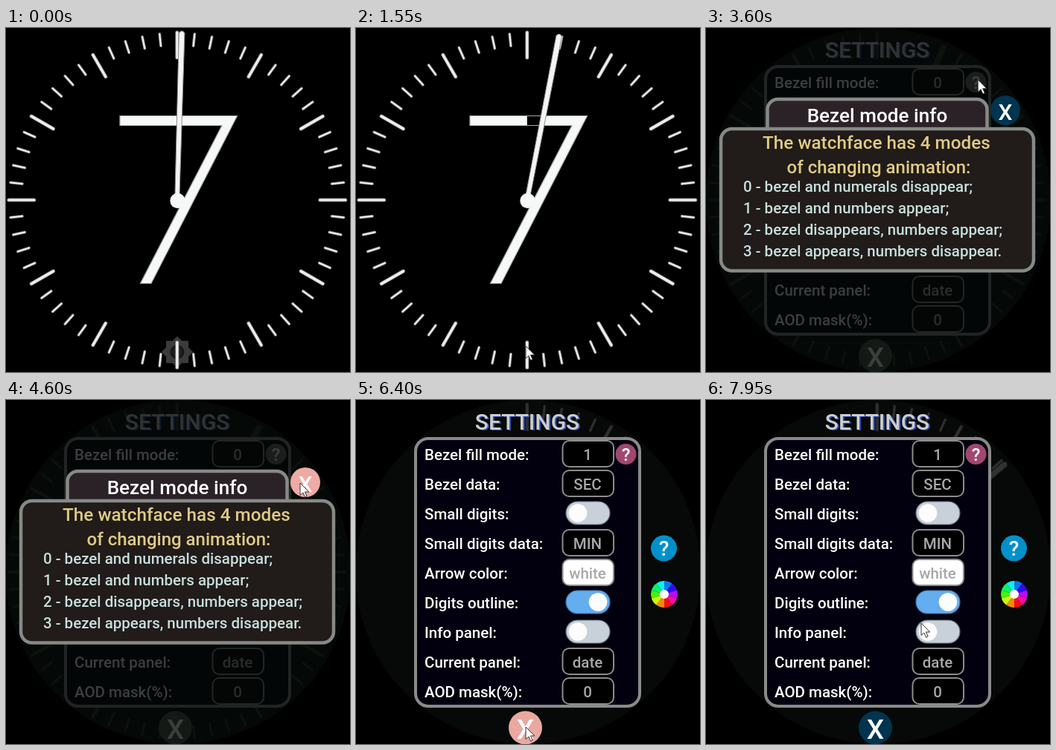
An HTML page that plays this animation: 462 by 464 pixels, repeating every 8000 ms.

```html
<!DOCTYPE html>
<html lang="en">
<head>
<meta charset="utf-8">
<title>Watch face settings</title>
<style>
  html, body { margin: 0; width: 100%; height: 100%; overflow: hidden; background: #000; }
  svg { display: block; width: 100vw; height: 100vh; }
  text { font-family: Roboto, sans-serif; font-weight: 500; }
</style>
</head>
<body>
<svg id="stage" viewBox="0 0 462 464"></svg>
<script>
const LOOP = 8000, CX = 229.8, CY = 232;
const stage = document.getElementById('stage');

function add(parent, tag, attrs = {}, text) {
  const el = document.createElementNS('http://www.w3.org/2000/svg', tag);
  for (const k in attrs) el.setAttribute(k, attrs[k]);
  if (text !== undefined) el.textContent = text;
  parent.appendChild(el);
  return el;
}
const group = parent => add(parent, 'g');
const circle = (parent, cx, cy, r, fill, opacity = 1) =>
  add(parent, 'circle', { cx, cy, r, fill, 'fill-opacity': opacity });
const box = (parent, x, y, width, height, rx, fill, stroke, sw) =>
  add(parent, 'rect', { x, y, width, height, rx, fill, stroke, 'stroke-width': sw });
const label = (parent, x, y, str, fill = '#fff', size = 20.5, anchor = 'start') =>
  add(parent, 'text', { x, y, fill, 'font-size': size, 'text-anchor': anchor }, str);
const show = (el, on) => el.setAttribute('visibility', on ? 'visible' : 'hidden');

function polar(deg, r) {
  const a = deg * Math.PI / 180;
  return [CX + r * Math.sin(a), CY - r * Math.cos(a)];
}
function sector(from, to) {
  const [x0, y0] = polar(from, 400), [x1, y1] = polar(to, 400);
  return `M${CX} ${CY}L${x0} ${y0}A400 400 0 ${to - from > 180 ? 1 : 0} 1 ${x1} ${y1}Z`;
}

// Clock
const clock = group(stage);
const gear = group(clock);
for (const turn of [0, 45])
  add(gear, 'rect', { x: 215, y: 422, width: 30, height: 30, fill: '#3c3c3c', transform: `rotate(${turn} 230 437)` });
add(gear, 'circle', { cx: 230, cy: 437, r: 8, fill: '#222', stroke: '#191919', 'stroke-width': 3 });

const ticks = Array.from({ length: 60 }, (_, i) => {
  const major = i % 5 === 0;
  const [x1, y1] = polar(i * 6, major ? 192 : 209);
  const [x2, y2] = polar(i * 6, major ? 226 : 225);
  const g = group(clock);
  const w = major ? 5 : 3.8;
  add(g, 'line', { x1, y1, x2, y2, stroke: '#888', 'stroke-width': w, 'stroke-linecap': 'round' });
  add(g, 'line', { x1, y1, x2, y2, stroke: '#efefef', 'stroke-width': w - 1.8, 'stroke-linecap': 'round' });
  return g;
});

const seven = 'M153 118.5H310.5L195 344.5H180.5L290 131.5H153Z';
const clip = add(add(add(stage, 'defs'), 'clipPath', { id: 'sweep' }), 'path');
add(clock, 'path', { d: seven, fill: '#f6f8f8', 'clip-path': 'url(#sweep)' });
add(clock, 'path', { d: seven, fill: 'none', stroke: '#a8a8a8', 'stroke-width': 1.2 });

const hand = group(clock);
add(hand, 'path', {
  d: `M${CX - 3} ${CY}L${CX - 3.8} 7Q${CX} 1 ${CX + 3.8} 7L${CX + 3} ${CY}Z`,
  fill: '#f4f4f4', stroke: '#909090', 'stroke-width': 1
});
circle(clock, 230.5, 233, 10.2, '#f6f8f8');

// Settings screen
const settings = group(stage);
circle(settings, 231, 232, 232, '#080c09', .83);
label(settings, 232, 41, 'SETTINGS', '#2c4cb4', 30, 'middle');
label(settings, 230, 40, 'SETTINGS', '#cdcdcd', 30, 'middle');
box(settings, 80, 52, 301, 361, 17, '#02000e', '#8a8a8a', 4);

function valueButton(y, str) {
  const light = str === 'white';
  const rect = box(settings, 277.5, y - 17.5, 68.5, 35, 9, light ? '#fff' : '#000', '#8c8c8c', 2);
  const text = label(settings, 311, y + 8.5, str, '#a8a8a8', 20.5, 'middle');
  return { rect, text };
}
function toggle(y, on) {
  box(settings, 282, y - 15.5, 59, 31, 15.5, on ? '#64adee' : '#c8d1d9', on ? '#3f78ac' : '#66747e', 1.2);
  circle(settings, on ? 325 : 298, y, 12.3, '#fcfcfc');
}
const rows = [
  ['Bezel fill mode:', '0'], ['Bezel data:', 'SEC'], ['Small digits:', false],
  ['Small digits data:', 'MIN'], ['Arrow color:', 'white'], ['Digits outline:', true],
  ['Info panel:', false], ['Current panel:', 'date'], ['AOD mask(%):', '0']
];
const controls = rows.map(([name, value], i) => {
  const y = 72.5 + 40 * i;
  label(settings, 92, y + 8.5, name);
  return typeof value === 'string' ? valueButton(y, value) : toggle(y, value);
});
const modeButton = controls[0];

function roundButton(parent, x, y, r, fill, str, size, drop = 0) {
  const disc = circle(parent, x, y, r, fill);
  label(parent, x, y + size * .357 + drop, str, '#fff', size, 'middle');
  return disc;
}
const help = roundButton(settings, 362.5, 73, 14, '#a0486e', '?', 24);
roundButton(settings, 413.5, 200, 17.5, '#0290cb', '?', 28);
const exit = roundButton(settings, 227.5, 442, 22.5, '#00344f', 'X', 37, 2);

for (let i = 0; i < 10; i++) {
  const at = deg => {
    const a = deg * Math.PI / 180;
    return `${414 + 18 * Math.sin(a)} ${262 - 18 * Math.cos(a)}`;
  };
  add(settings, 'path', {
    d: `M414 262L${at(i * 36)}A18 18 0 0 1 ${at(i * 36 + 36)}Z`,
    fill: `hsl(${213 + i * 36} 90% 50%)`
  });
}
circle(settings, 414, 262, 6, '#fff');

// Info popup
const popup = group(stage);
circle(popup, 231, 232, 232, '#050806', .78);
box(popup, 82.5, 96, 295, 80, 14, '#2b2227', '#868a86', 4.5);
label(popup, 230, 127, 'Bezel mode info', '#fff', 26.1, 'middle');
box(popup, 20, 136, 420, 191.5, 15, '#211b19', '#868a86', 4.5);
label(popup, 229, 163, 'The watchface has 4 modes', '#dfcb85', 24.3, 'middle');
label(popup, 232, 196, 'of changing animation:', '#dfcb85', 24, 'middle');
[
  '0 - bezel and numerals disappear;',
  '1 - bezel and numbers appear;',
  '2 - bezel disappears, numbers appear;',
  '3 - bezel appears, numbers disappear.'
].forEach((str, i) => label(popup, 50, 221 + 29 * i, str, '#c6dfdc'));
const close = roundButton(popup, 402, 111, 20, '#00344f', 'X', 30, 2);

const cursor = add(stage, 'path', {
  d: 'M0 0V16.5L3.9 13L6.6 19.2L9.2 18L6.5 12H11.8Z',
  fill: '#fff', stroke: '#333', 'stroke-width': 1
});

// Pointer stops: time, x, y
const stops = [
  [500, 464, 400], [1250, 228, 429], [1950, 228, 429], [2700, 364, 68],
  [3500, 364, 68], [4350, 395, 112], [4750, 395, 112], [5250, 315, 73],
  [5600, 315, 73], [6250, 228, 441], [7400, 228, 441], [7950, 289, 301], [8000, 289, 301]
];
function pointer(t) {
  const n = stops.findIndex(s => s[0] > t);
  if (n < 1) return stops[0].slice(1);
  const [t0, x0, y0] = stops[n - 1], [t1, x1, y1] = stops[n];
  const k = (t - t0) / (t1 - t0), e = k * k * (3 - 2 * k);
  return [x0 + (x1 - x0) * e, y0 + (y1 - y0) * e];
}

const within = (t, a, b) => t >= a && t < b;

function draw(t) {
  const angle = 1.6 + t * .00605;
  const appear = t >= 5500;
  const modal = within(t, 2950, 4750);

  hand.setAttribute('transform', `rotate(${angle} ${CX} ${CY})`);
  clip.setAttribute('d', appear ? sector(0, angle) : sector(angle, 360));
  ticks.forEach((el, i) => show(el, i === 0 || (i * 6 <= angle) === appear));
  gear.setAttribute('opacity', Math.max(0, 1 - t / 275));

  show(settings, within(t, 1700, 6500) || t >= 7300);
  show(popup, modal);

  const pressed = within(t, 5350, 5500);
  modeButton.rect.setAttribute('fill', pressed ? '#c8c8c8' : '#000');
  modeButton.text.textContent = appear ? '1' : '0';
  help.setAttribute('fill', modal ? '#6a6a6a' : within(t, 2780, 2950) ? '#7c584f' : '#a0486e');
  close.setAttribute('fill', within(t, 4500, 4750) ? '#eeaaa4' : '#00344f');
  exit.setAttribute('fill', modal ? '#4c5654' : within(t, 6300, 6500) ? '#eaa9a0' : '#00344f');

  const [x, y] = pointer(t);
  cursor.setAttribute('transform', `translate(${x} ${y})`);
}

const start = performance.now();
function tick() {
  draw((performance.now() - start) % LOOP);
  requestAnimationFrame(tick);
}
tick();
</script>
</body>
</html>
```
